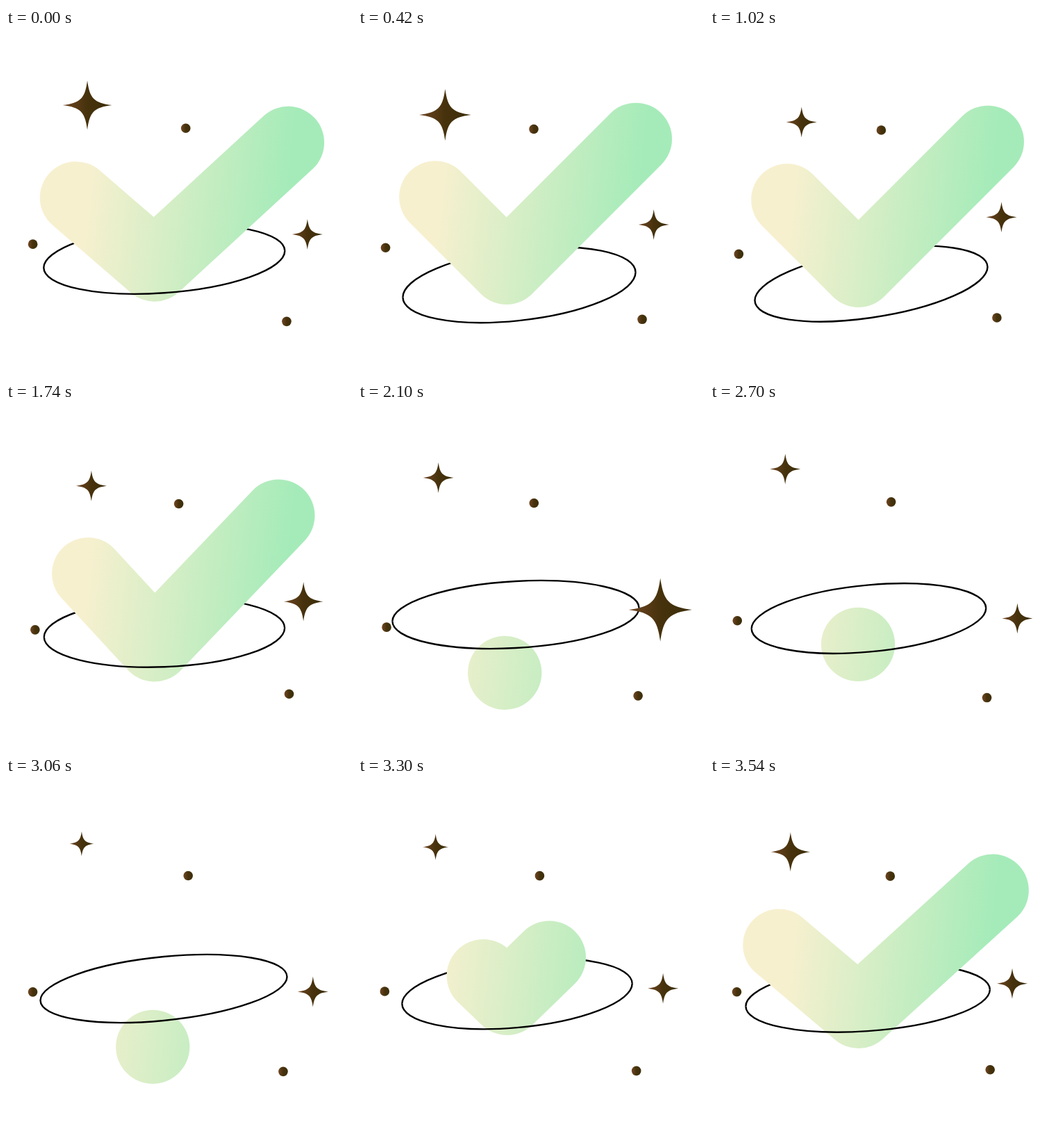
Animation of 498 by 498 pixels, one loop 3.6 s. Source, as an HTML page:

```html
<!DOCTYPE html>
<html lang="en">
<head>
<meta charset="utf-8">
<title>Check mark with ring</title>
<style>
html, body { margin: 0; width: 100%; height: 100%; overflow: hidden; background: #fff; }
svg { display: block; width: 498px; height: 498px; }
.ring { fill: none; stroke: #000; stroke-width: 2.4; vector-effect: non-scaling-stroke; }
.spark { fill: url(#brown); }
#check { fill: none; stroke: url(#mint); stroke-linecap: round; stroke-linejoin: round; }
</style>
</head>
<body>
<svg viewBox="0 0 498 498">
  <defs>
    <linearGradient id="mint" gradientUnits="userSpaceOnUse" x1="118" y1="215" x2="404" y2="245">
      <stop offset="0" stop-color="#f7f0cf"/>
      <stop offset="1" stop-color="#a5ebb9"/>
    </linearGradient>
    <linearGradient id="brown">
      <stop offset="0" stop-color="#704624"/>
      <stop offset=".5" stop-color="#46320c"/>
      <stop offset="1" stop-color="#3c2e0a"/>
    </linearGradient>
    <path id="star" d="M0-1C.1-.27 .27-.1 1 0C.27 .1 .1 .27 0 1C-.1 .27-.27 .1-1 0C-.27-.1-.1-.27 0-1Z"/>
  </defs>
  <path class="ring" d="M-1 0A1 1 0 0 1 1 0"/>
  <path id="check"/>
  <path class="ring" d="M-1 0A1 1 0 0 0 1 0"/>
  <use href="#star" class="spark star"/>
  <use href="#star" class="spark star"/>
  <circle class="spark dot" r="6.8"/>
  <circle class="spark dot" r="6.8"/>
  <circle class="spark dot" r="6.8"/>
</svg>
<script>
const LOOP = 3600, STEP = 60, LANDING = 2100, HOP = 480;
const all = s => [...document.querySelectorAll(s)];
const rings = all('.ring'), stars = all('.star'), dots = all('.dot');
const check = document.getElementById('check');

const ramp = (t, a, b) => {
  const p = Math.min(1, Math.max(0, (t - a) / (b - a)));
  return p * p * (3 - 2 * p);
};

// Eases 0 to 1 over a..b and back over c..d, wrapping around the loop
const pulse = (t, a, b, c, d) => {
  const s = a + ((t - a) % LOOP + LOOP) % LOOP;
  return ramp(s, a, b) - ramp(s, c, d);
};

const wave = (t, peak, period = LOOP) => Math.cos((t - peak) / period * 2 * Math.PI);
const place = (el, x, y, s = 1) => el.setAttribute('transform', `translate(${x} ${y}) scale(${s})`);

const openness = t => pulse(t, 3190, 3480, 5320, 5610);
const bob = t => 5.2 * openness(t) * wave(t, 980, 720);
const hop = t => t < LANDING ? 0 : (1 - openness(t)) * (1 - wave(t, LANDING, HOP)) / 2;
const starSize = t => 22 + 25.5 * pulse(t, 3440, 3750, 3825, 4275)
  - 4.5 * pulse(t, 2820, 3100, 3200, 3480);

function drawCheck(t) {
  const open = openness(t), ball = 1 - open, h = hop(t);
  const x = 213.7 - 2.5 * ball + 3.8 * h;
  const y = 345 + bob(t) + 45 * ball - 82 * h;
  const spread = 5 * pulse(t, 3200, 3480, 3480, 3960) - 5 * pulse(t, 1600, 1900, 2000, 2400);
  const tip = (side, len, deg) => {
    const r = deg * Math.PI / 180, l = len * Math.max(open, .001);
    return `${x + side * l * Math.cos(r)} ${y - l * Math.sin(r)}`;
  };
  const left = tip(-1, 145 + spread, 45 - spread);
  const right = tip(1, 263.4 - .5 * Math.abs(spread), 45 - .57 * spread);
  check.setAttribute('d', `M${left}L${x} ${y}L${right}`);
  check.setAttribute('stroke-width', 104 + 2 * ball);
}

function drawRing(t) {
  const low = pulse(t, 3440, 3810, 5100, 5540), h = hop(t);
  const tilt = 12 + 12 * pulse(t, 3560, 4500, 4620, 5340)
    - 5.5 * pulse(t, 1200, 1740, 1740, 2400) + 5 * pulse(t, 2340, 3000, 3060, 3540);
  const rx = 177.5 - 17.5 * h - 10 * low;
  const ry = 49 + 2.8 * h + 5.5 * low * low;
  const y = 306 + 64 * low + 11 * h - .4 * bob(t);
  const m = [rx, -tilt, 0, Math.sqrt(ry * ry - tilt * tilt), 227 + 5 * low * low + 3 * h, y];
  rings.forEach(el => el.setAttribute('transform', `matrix(${m})`));
}

function drawSparks(t) {
  const u = 2 * pulse(t, 1010, 2760, 2880, 4610) - 1;
  const top = wave(t, 3050), left = wave(t, 1510);
  place(stars[0], 120 - 11.8 * u, 116 - 19.6 * u, starSize(t));
  place(stars[1], 431 + 11.5 * u, 292 + 19.7 * u, starSize(t + LOOP / 2));
  place(dots[0], 254 + 8.2 * top, 145.3 - 1.8 * top);
  place(dots[1], 40.2 + 1.8 * left, 319.3 + 9.3 * left);
  place(dots[2], 405.7 - 7.2 * u, 421.3 + 4.3 * u);
}

const start = performance.now();
function draw() {
  const t = Math.floor((performance.now() - start) % LOOP / STEP) * STEP;
  drawCheck(t);
  drawRing(t);
  drawSparks(t);
  requestAnimationFrame(draw);
}
draw();
</script>
</body>
</html>
```
